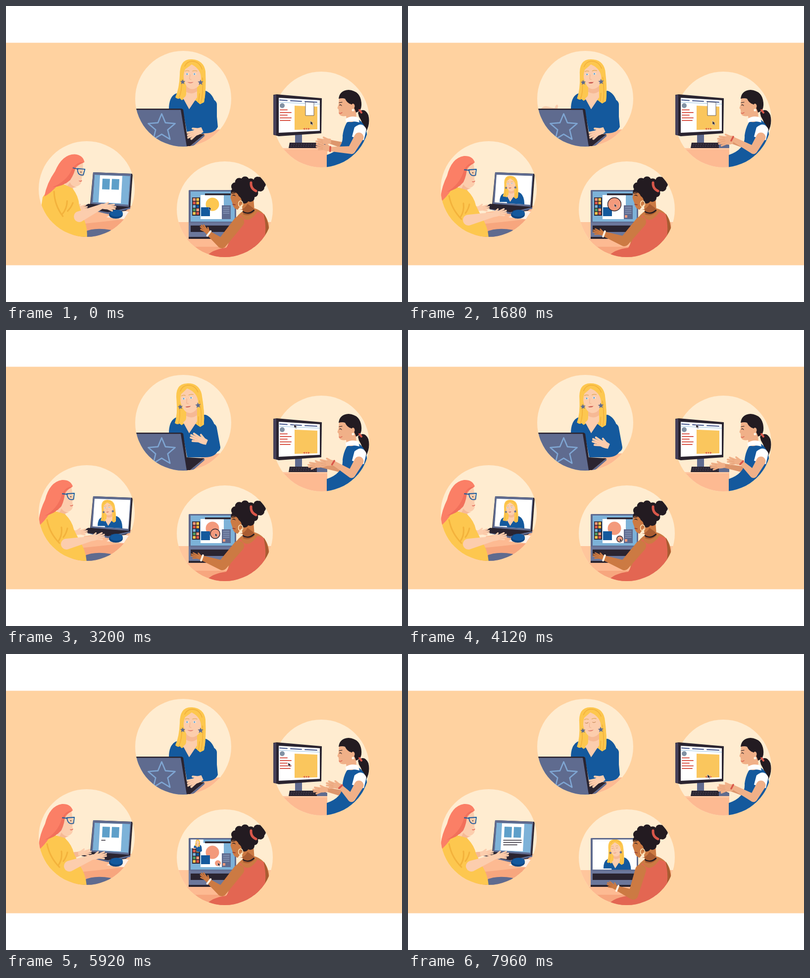
Recreate the animation shown at these times as an HTML page. Size 800 by 600 pixels, loop 8000 ms.

```html
<!DOCTYPE html>
<html lang="en">
<head>
<meta charset="utf-8">
<title>Women at work</title>
<style>
html, body { margin: 0; width: 100%; height: 100%; overflow: hidden; background: #fff; }
svg { display: block; width: 100vw; height: 100vh; }
</style>
</head>
<body>
<svg id="stage" viewBox="0 0 800 600"></svg>
<script>
const LOOP = 8000;
const C = {
  cream: '#ffecd0', desk: '#fdba92', deskDark: '#f7a67e', ink: '#2a2430', slate: '#5f6b8f',
  sky: '#7db2d8', blue: '#14599d', navy: '#0f4680', gold: '#fdc74f', amber: '#f3b23c',
  fair: '#fccdad', fairDark: '#f6b995', tan: '#f0b088', tanDark: '#dd966c',
  brown: '#cc7a43', brownDark: '#a95c31', coral: '#e36652', peach: '#f39a7c', red: '#d9574a', hair: '#231b21'
};

const path = (d, fill, extra = '') => `<path d="${d}" fill="${fill}" ${extra}/>`;
const line = (d, stroke, w = 1, extra = '') =>
  `<path d="${d}" fill="none" stroke="${stroke}" stroke-width="${w}" stroke-linecap="round" stroke-linejoin="round" ${extra}/>`;
const rect = (x, y, w, h, fill, extra = '') =>
  `<rect x="${x}" y="${y}" width="${w}" height="${h}" fill="${fill}" ${extra}/>`;
const oval = (x, y, rx, ry, fill, extra = '') =>
  `<ellipse cx="${x}" cy="${y}" rx="${rx}" ry="${ry}" fill="${fill}" ${extra}/>`;
const dot = (x, y, r, fill, extra) => oval(x, y, r, r, fill, extra);
const group = (id, body) => `<g id="${id}">${body}</g>`;
const slot = (id, fill) => path('', fill, `id="${id}"`);
const repeat = (n, make) => Array.from({ length: n }, (_, i) => make(i)).join('');

const star = (x, y, r) => 'M' + Array.from({ length: 10 }, (_, i) => {
  const a = i * Math.PI / 5 - Math.PI / 2, q = i % 2 ? r * .45 : r;
  return `${(x + q * Math.cos(a)).toFixed(1)} ${(y + q * Math.sin(a)).toFixed(1)}`;
}).join('L') + 'Z';

// A hand with its wrist at 0,0 and fingers towards -x
const hand = (id, skin, shade) => group(id,
  path('M3 -5.5Q-8 -8 -16 -6L-17 5Q-8 8 3 5Z', skin) +
  line('M-14 -4L-28 -7M-15 -1L-32 -2M-15 2L-31 3M-13 4L-25 8M-5 -5L-14 -10', skin, 4) +
  line('M-17 -3L-27 -4.5M-17 .7L-28 .7M-16 4L-26 5.5', shade, .7));

const arrow = id => group(id,
  path('M0 0V8.5L2.2 6.8L4 10L5.6 9.2L4 6.2L6.8 5.8Z', C.ink, 'stroke="#fff" stroke-width=".6"'));

// A round scene; "behind" may reach past the circle's edge
const vignette = (id, x, y, body, behind = '') =>
  `<clipPath id="${id}Clip"><circle cx="${x}" cy="${y}" r="97"/></clipPath>` +
  dot(x, y, 97, C.cream) + behind + `<g clip-path="url(#${id}Clip)">${body}</g>`;

function bust() {
  const eye = x => oval(x, 138, 3, 1.9, '#f3f4f2') + dot(x - .2, 138, 1.7, '#6ba3cc');
  return group('bust',
    path('M329 210Q329 185 342 178L362 171H388L404 172Q420 179 424 203L428 245Q422 258 402 258H366L357 210Z', C.blue) +
    `<g class="head">` +
      path('M376 108Q351 106 351 140Q350 168 342 185Q347 190 351 187L355 191L364 186L384 192L392 199L400 195Q405 170 403 133Q400 110 376 108Z', C.gold) +
    `</g>` +
    path('M364 155H386V185L370 209L358 187Q364 184 364 178Z', C.fairDark) +
    path('M364 174Q374 181 386 173V185L370 209L358 187Q364 184 364 178Z', C.fair) +
    `<g class="head">` +
      path('M358 128Q360 115 376 116Q394 119 395 136Q396 157 386 165Q376 172 367 165Q357 154 358 128Z', C.fair) +
      path('M378 110Q356 109 354 140Q353 170 344 186Q350 189 353 185Q360 178 359 160Q357 138 362 128Q371 122 378 116Z', C.gold) +
      path('M372 111Q400 108 402 140Q405 172 400 195L392 199L386 194Q395 172 394 145Q393 126 372 117Z', C.gold) +
      line('M355 150Q356 172 349 187M397 146Q399 174 394 196M391 178L389 194M376 112Q366 112 361 122M377 112Q391 113 396 128', C.amber, 1.8) +
      group('eyes', eye(366) + eye(381)) +
      line('M363 138.5Q366 140.5 369 138.5M378 138.5Q381 140.5 384 138.5', '#c68a55', 1.2, 'id="lids"') +
      line('M362 132Q366 130 370 132M377 132Q381 130 386 132', '#e0a650', 1.2) +
      line('M372 139L370.5 148L374 149', '#efb08d', 1.1) +
      path('M366 154Q372 155.5 379 154Q373 159 366 154Z', '#de7665') +
      oval(372.5, 155.5, 4.5, 0, '#c9594f', 'id="mouth"') +
      path(star(357, 154, 5.5), C.slate) + path(star(393, 155, 6), C.slate) +
    `</g>`);
}

function host() {
  return path('M360 290L400 254L432 250V290Z', C.desk) + bust() +
    group('backHand', path('M266 212Q272 201 283 204L296 207L299 201Q303 198 303 204L301 212Z', C.fair)) +
    path('M364 258L401 260L372 284H364Z', C.ink) + path('M372 284L401 260V264L378 284Z', C.slate) +
    slot('hostArm', C.blue) + hand('hostHand', C.fair, C.fairDark) +
    path('M255 209H355L367 286H255Z', C.slate) +
    path('M262 208H355L358 210L369 284H365L353 210.5H262Z', C.ink) +
    line(star(314.5, 247, 28.5), '#7fa6d3', 2.6);
}

function monitor() {
  return path('M584 260H598V279H584Z', C.slate) +
    path('M540 180L547 179L638 187L637 258L551 264L540 261Z', C.ink) +
    path('M540 181L546 180V262L540 261Z', '#46415a') +
    path('M551 186L634 191V253L551 257Z', '#fff') +
    line('M551 195L634 199', C.sky, .8) +
    line('M553 190.5L568 191.4M575 192L597 193.2M604 193.8L628 195', '#44568c', 2) +
    dot(558, 202, 5, '#8291a3') +
    repeat(5, i => line(`M554 ${210.5 + i * 5.4}h${i % 2 ? 22 : i === 4 ? 20 : 14}`, C.red, 2)) +
    path('M583 202L629 204V250L583 251Z', '#fac65d') +
    path('M604 247V251L600 249ZM610 247V251L614 249Z', C.red) + dot(607, 249, 1.4, C.red) +
    path('M605 194.5L622 195.5V222H605Z', '#fff', 'id="popup" stroke="#4a4652" stroke-width=".8"') +
    arrow('cursorB');
}

function designer() {
  return path('M540 288H649V330H540Z', C.desk) + path('M540 288H649V291H540Z', '#ffc8a2') +
    path('M573 277H638L649 282V288H571Z', C.ink) + path('M628 279H640L649 282V288H628Z', C.slate) +
    line('M576 280H626M575 284H627', '#5a5365', 1, 'stroke-dasharray="2 3"') +
    slot('farArmB', C.tanDark) + hand('farHandB', C.tan, C.tanDark) +
    path('M711 216Q724 204 732 221Q738 244 720 266Q726 244 713 224Z', C.hair) +
    path('M690 234L712 230Q734 244 729 285L702 328H648V302Q682 290 680 263Q682 246 690 234Z', C.blue) +
    path('M673 186L672 199L669.5 207L672 210L672.5 217Q674 225 687 223L689 234Q702 238 708 230L706 192Z', C.tan) +
    path('M672 188Q674 171 692 170Q716 172 718 196Q719 207 714 213L707 216Q704 205 697 199Q689 197 685 188Q679 186 672 188Z', C.hair) +
    oval(701, 203, 3.5, 5, C.tan) + dot(701, 211, 2.5, '#fff4e4') +
    line('M674 201Q676 199 678 202M673 196L679 195', C.hair, 1.2) +
    line('M673 217Q676 218.5 679 216', C.red, 1.2) + line('M714 211L718 216', C.red, 4) +
    path('M686 229Q697 221 712 226L714 236Q700 232 687 236Z', '#fff') +
    path('M704 246Q720 233 728 250L723 272L699 265Z', '#fff') +
    slot('armB', C.tan) + hand('handB', C.tan, C.tanDark) + line('', C.red, 3.5, 'id="bandB"');
}

function writer() {
  const screen = 'M179 342L251 344.5L247 403L175 398Z';
  return path('M120 470L158 418L262 404V470Z', C.desk) + path('M130 470L150 442L262 430V470Z', C.deskDark) +
    path('M203 428L232 414L248 417L238 432Z', '#fff0e6') +
    path('M176 337L256 340L251 409L170 402Z', C.ink) + path('M176 337L253 340L248 407L171 401Z', C.slate) +
    `<clipPath id="screenC"><path d="${screen}"/></clipPath><g clip-path="url(#screenC)">` +
      path(screen, C.sky) + path('M190 343L235 344.5L232 400L187 398Z', '#fff') +
      path('M195 350L210 350.5L209 372L194 371.5ZM214 350.5L229 351L228 372.5L213 372Z', '#5e9fc9') +
      repeat(3, i => line('', C.ink, 1.5, `id="row${i}"`)) +
      group('videoC', rect(174, 340, 80, 66, '#fff') + '<use href="#bust" transform="translate(14 288) scale(.52)"/>') +
    `</g>` +
    path('M166 401L251 408L242 415L206 421L152 409Z', C.ink) + path('M152 409L206 418L251 408V411L206 422Z', C.slate) +
    oval(222, 423, 14, 8, C.navy) + oval(223, 420, 13, 7, C.blue) + line('M214 414L210 420', C.navy) +
    path('M158 458Q178 448 212 454L205 470H155Z', C.slate) +
    slot('farArmC', C.fairDark) + hand('farHandC', C.fair, C.fairDark) +
    group('leanC',
      path('M109 345L117 318H132L134 330L138 344L134 347L135 357Q134 368 121 369L119 380L100 378Z', C.fair) +
      path('M112 362Q118 371 128 369L119 372L117 380L104 378Z', C.fairDark) +
      path('M62 400Q68 384 95 366L119 373Q134 388 137 404L150 430Q163 450 163 475H62Z', C.gold) +
      path('M135 317Q130 303 113 304Q88 308 79 344Q66 370 65 398Q76 390 88 372Q108 368 116 345Q117 326 135 317Z', '#fb7f66') +
      path('M134 318Q122 316 113 333Q105 362 78 377Q100 372 112 357Q119 342 119 327Z', '#f2705b') +
      line('M114 332L124 333M123 332L138 331L136.5 343Q125 347 123 332', C.blue, 1.8) +
      dot(131, 338, 1.1, C.ink) + line('M130 356Q132 357.5 135 355', C.red, 1.3) +
      path('M84 382Q104 376 118 396L136 404L118 440Q92 426 84 382Z', C.gold) +
      line('M83 385Q88 412 108 432M112 400Q114 416 106 428M124 402Q122 412 116 420', C.amber, 3)) +
    slot('armC', C.fair) + hand('handC', C.fair, C.fairDark);
}

function artist() {
  const swatches = repeat(10, i =>
    rect(377.5 + i % 2 * 7, 389.5 + (i >> 1) * 7, 5.5, 5.5, [C.peach, C.gold, C.red, C.amber, C.sky, C.blue, '#4c9a63'][i % 7]));
  const curls = repeat(9, i => {
    const a = 2.9 + i * .62;
    return dot(482 + 20 * Math.cos(a), 373 + 19 * Math.sin(a), 8.5, C.hair);
  });
  const bun = repeat(6, i => dot(511 + 6 * Math.cos(i * 1.05), 361 + 8 * Math.sin(i * 1.05), 8, C.hair));
  return rect(340, 438, 205, 80, '#ffc69c') + path('M340 472H470V512H340Z', C.deskDark) +
    path('M340 472H470V488H340Z', C.desk) +
    rect(369, 373, 96, 68, C.slate, 'rx="1.5"') + rect(369, 439, 94, 33, '#6c779b') +
    rect(373, 445, 84, 13, C.ink) + rect(369, 468, 90, 4, C.ink) +
    `<clipPath id="screenD"><rect x="373" y="376" width="89" height="61"/></clipPath><g clip-path="url(#screenD)">` +
      rect(373, 376, 89, 61, C.sky) + rect(393, 383, 47, 49, '#fff') + rect(402, 380, 52, 3.5, C.ink) +
      rect(376, 388, 16, 37, C.ink) + swatches +
      dot(417, 402, 13.5, C.gold, 'id="disc"') + rect(394, 408, 18, 18, C.blue) +
      rect(436, 404, 18, 28, C.slate) + repeat(4, i => line(`M439 ${408 + i * 4}h12`, '#9fb2d1')) +
      rect(438, 424, 5, 5, C.peach, 'id="swatch"') +
      dot(0, 0, 1, C.peach, 'id="ring" stroke="#2a2430"') + arrow('cursorD') +
      group('videoD', rect(373, 376, 89, 61, '#fff') + '<use href="#bust" transform="translate(204 313) scale(.58)"/>') +
    `</g>` +
    path('M460 436Q470 420 482 414L502 410Q524 417 530 440L534 465L520 490L448 486Z', C.brown) +
    path('M521 421Q530 434 532 464L524 480Z', C.brownDark) +
    path('M474 424Q488 446 508 417L520 421Q528 450 521 480L502 512H402Q412 494 445 490Q460 466 462 438Z', C.coral) +
    group('headD',
      path('M457 376L479 376L500 388L502 417Q490 428 479 422L476 400Z', C.brown) +
      path('M472 413Q482 412 488 401L500 410L502 417Q490 428 479 422V413Z', C.brownDark) +
      oval(482, 373, 22, 20, C.hair) + curls + bun +
      line('M495 358Q494 370 505 375', C.red, 5) +
      path('M456 378Q466 375 470 385Q478 390 476 402L468 413Q459 411 457.5 400L455 393L453.5 388Z', C.brown) +
      line('M458 384Q461 382 463 385M457 379.5L463 378.5', C.hair, 1.3) +
      line('M458 402L463 403', '#8f352f', 1.4) +
      oval(474, 401, 4.5, 6, 'none', 'stroke="#ffe3b5" stroke-width="1.6"') +
      line('M479 417Q490 424 501 414', C.hair, 2.4)) +
    slot('armD', C.brown) + hand('handD', C.brown, C.brownDark) + line('', '#fff1e2', 4, 'id="bandD"');
}

const svg = document.getElementById('stage');
svg.innerHTML = rect(0, 0, 800, 600, '#fff') + rect(0, 74.5, 800, 451, '#ffd2a0') +
  vignette('host', 358, 188, host()) + vignette('designer', 637, 230, designer(), monitor()) +
  vignette('writer', 163, 371, writer()) + vignette('artist', 442, 412, artist());

const el = {};
svg.querySelectorAll('[id]').forEach(n => el[n.id] = n);
const heads = svg.querySelectorAll('.head');
const set = (id, attrs) => { for (const k in attrs) el[id].setAttribute(k, attrs[k]); };
const show = (id, on) => set(id, { visibility: on ? 'visible' : 'hidden' });
const place = (id, x, y, a = 0, s = 1, flip = 1) =>
  set(id, { transform: `translate(${x} ${y}) rotate(${a}) scale(${s * flip} ${s})` });

const ramp = (t, a, b) => Math.max(0, Math.min(1, (t - a) / (b - a)));
const ease = (t, a, b) => { const p = ramp(t, a, b); return p * p * (3 - 2 * p); };
const mix = (a, b, p) => a.map((v, i) => v + (b[i] - v) * p);
const wave = (t, period) => Math.sin(t / period * 2 * Math.PI);

// Tapered arm through joints of [x, y, radius]
function limb(id, ...joints) {
  let d = '';
  for (let i = 1; i < joints.length; i++) {
    const [x, y, r] = joints[i - 1], [u, v, q] = joints[i];
    const len = Math.hypot(u - x, v - y) || 1, nx = (y - v) / len, ny = (u - x) / len;
    d += `M${x + nx * r} ${y + ny * r}L${u + nx * q} ${v + ny * q}A${q} ${q} 0 0 0 ${u - nx * q} ${v - ny * q}` +
      `L${x - nx * r} ${y - ny * r}A${r} ${r} 0 0 0 ${x + nx * r} ${y + ny * r}Z`;
  }
  set(id, { d });
}

function band(id, x, y, ex, ey, r) {
  const len = Math.hypot(ex - x, ey - y), nx = (y - ey) / len * r, ny = (ex - x) / len * r;
  set(id, { d: `M${x + nx} ${y + ny}L${x - nx} ${y - ny}` });
}

function zoom(id, p, x, y) {
  show(id, p > 0);
  set(id, { transform: `translate(${x} ${y}) scale(${p}) translate(${-x} ${-y})` });
}

function drawHost(t) {
  const tilt = -3.5 * (1 - Math.cos(t / 6000 * 2 * Math.PI));
  heads.forEach(h => h.setAttribute('transform', `rotate(${tilt} 372 195)`));
  set('mouth', { ry: t > 1000 && t < 5300 ? .2 + 1.2 * Math.abs(wave(t, 940)) : 0 });
  const blink = t % 2680 > 2560;
  show('eyes', !blink);
  show('lids', blink);
  place('backHand', 0, 16 * (1 - ease(t, 1100, 1500) + ease(t, 1900, 2300)));
  const raised = ease(t, 2100, 2700) - ease(t, 5000, 5500);
  const bob = 7 * wave(t - 4050, 3400);
  const [x, y, a, ex, ey] = mix([394, 252, -24, 416, 244], [403, 234 + bob, 22, 423, 238], raised);
  limb('hostArm', [415, 200, 11], [ex, ey, 10], [x + 3, y, 7]);
  place('hostHand', x, y, a, 1);
}

function drawDesigner(t) {
  const tap = wave(t, 600);
  const reach = ease(t, 2500, 4500) - ease(t, 6000, 6800), low = 1 - ease(t, 900, 1500);
  const x = 655 + 21 * reach, y = 269 + 21 * low;
  const fx = 654 - 16 * (ease(t, 1900, 3100) - ease(t, 5000, 6600));
  limb('farArmB', [690, 285, 7], [fx, 275, 4]);
  place('farHandB', fx, 274 - tap, -4, .85);
  limb('armB', [713, 266, 9.5], [698, 292, 8], [x, y, 4.5]);
  place('handB', x, y + tap * .5, 15 * reach + 20 * low - 5, .9);
  band('bandB', x, y, 698, 292, 4.5);
  const menu = mix([615, 233], [582, 191], ease(t, 1900, 2700));
  const text = mix(menu, [570, 220], ease(t, 5000, 5700));
  place('cursorB', ...mix(text, [605, 244], ease(t, 7300, 7900)), 0, .9);
  show('popup', t < 2200);
}

function drawWriter(t) {
  const lean = 1 - ease(t, 700, 1450), work = ease(t, 5100, 5600);
  const tap = work * wave(t, 530);
  set('leanC', { transform: `rotate(${8.5 * lean} 150 475)` });
  const calm = mix([122, 434, 172, 423, -14], [148, 427, 194, 406, 6], lean);
  const [sx, sy, x, y, a] = mix(calm, [128, 430, 176, 411, -11], work);
  limb('armC', [sx, sy, 11], [x, y, 5]);
  place('handC', x, y + tap, a, .85, -1);
  const [fx, fy] = mix([140, 411], [148, 405], work);
  limb('farArmC', [120, 412, 9], [fx, fy, 4.5]);
  place('farHandC', fx, fy - tap, -6, .75, -1);
  zoom('videoC', ramp(t, 700, 900) - ramp(t, 4870, 5070), 252, 343);
  const typed = Math.max(0, (t - 5760) * .046);
  for (let i = 0; i < 3; i++) {
    const w = Math.max(0, Math.min(36, typed - i * 37));
    set('row' + i, { d: w ? `M193 ${377.5 + i * 4.6}h${w}` : '' });
  }
}

function drawArtist(t) {
  const picked = t > 900;
  set('disc', { fill: picked ? C.peach : C.gold });
  show('swatch', picked);
  show('ring', picked);
  const [x, y, r] = mix([417, 402, 13.5], [428, 424, 6], ease(t, 2100, 4300));
  set('ring', { cx: x, cy: y, rx: r, ry: r, 'stroke-width': t < 4400 ? 1.4 : 0 });
  const [cx, cy] = mix([410, 408], [x, y], ease(t, 300, 800));
  place('cursorD', cx, cy - 1, 0, .75);
  const point = 1 - ease(t, 600, 1300) + ease(t, 5300, 5800), rest = ease(t, 6050, 6900);
  const draw = mix([396, 462, 437, 477, 16], [410, 461, 436, 481, 44], point);
  const [wx, wy, ex, ey, a] = mix(draw, [423, 475, 455, 488, 27], rest);
  limb('armD', [470, 438, 11], [ex, ey, 10], [wx, wy, 5]);
  place('handD', wx, wy, a, .7);
  band('bandD', wx, wy, ex, ey, 5.5);
  zoom('videoD', ramp(t, 5840, 6120), 373, 376);
}

const start = performance.now();
function frame() {
  const t = (performance.now() - start) % LOOP;
  [drawHost, drawDesigner, drawWriter, drawArtist].forEach(draw => draw(t));
  requestAnimationFrame(frame);
}
frame();
</script>
</body>
</html>
```
